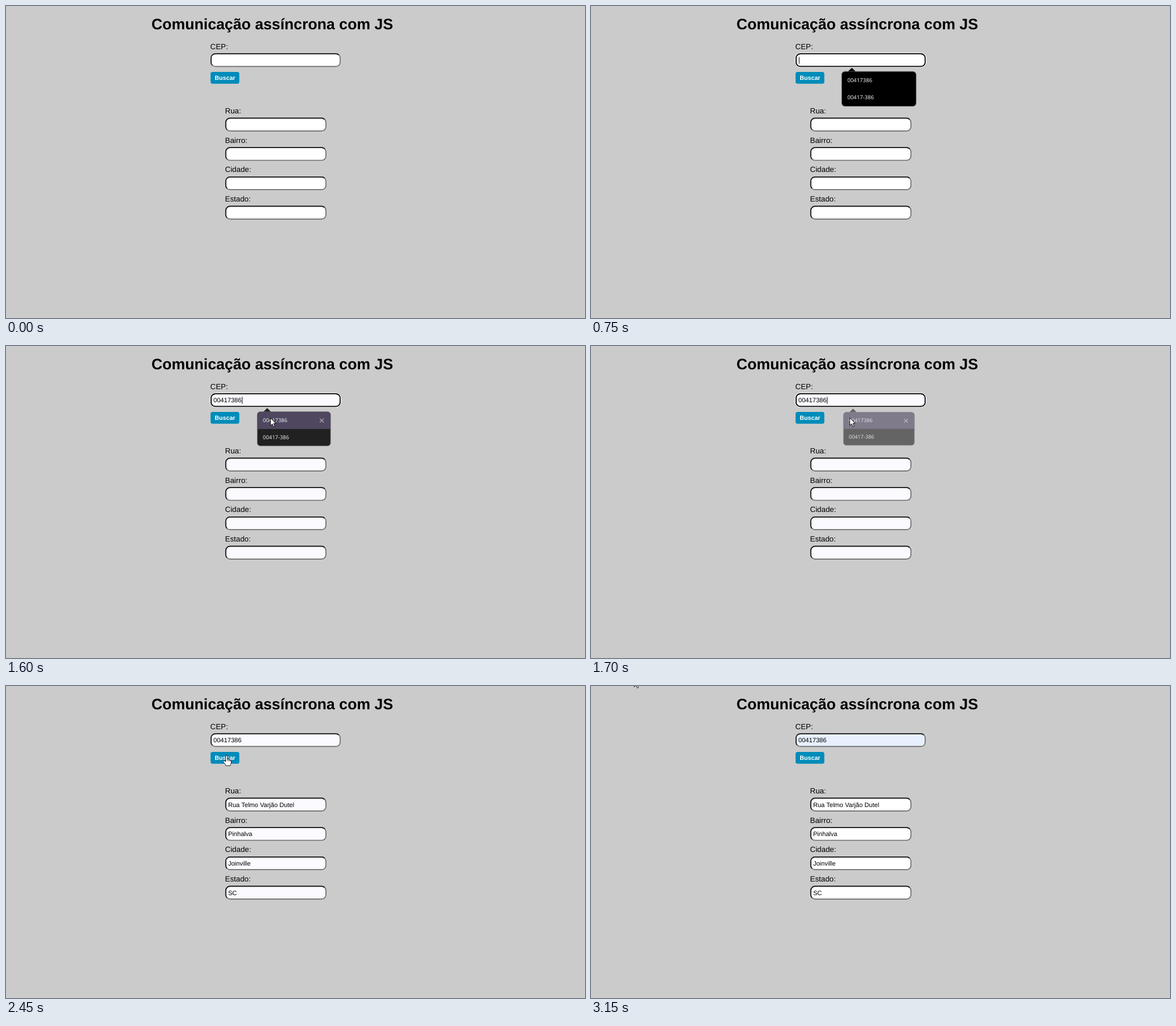
These frames come from a looping animation (1019x549 px, 3.3 s). An HTML page:

```html
<!DOCTYPE html>
<html lang="pt-BR">
<head>
<meta charset="utf-8">
<title>Comunicação assíncrona com JS</title>
<style>
  html, body { margin: 0; width: 100%; height: 100%; overflow: hidden; background: #cbcbcb; }
  svg { display: block; width: 100%; height: 100%; }
  text { font-family: "Liberation Sans", Arial, sans-serif; text-rendering: geometricPrecision; }
  .title { font-size: 26.67px; font-weight: bold; }
  .label { font-size: 13.33px; }
  .value { font-size: 11.11px; }
  .button { font-size: 10.67px; font-weight: bold; fill: #fff; text-anchor: middle; }
  .option { font-family: "Open Sans", "Noto Sans", sans-serif; font-size: 9.55px; fill: #fff; }
</style>
</head>
<body>
<svg viewBox="0 0 1019 549">
  <rect width="1019" height="549" fill="#cbcbcb"/>
  <text class="title" x="256" y="41">Comunicação assíncrona com JS</text>
  <g id="form"></g>
  <rect x="360" y="116" width="50.6" height="20.7" rx="3.5" fill="#008cba"/>
  <text class="button" x="385.4" y="130.2">Buscar</text>

  <g id="focus" fill="none">
    <rect x="359.5" y="82.7" width="230" height="25" rx="8.8" stroke="#fff"/>
    <rect x="360.9" y="84.1" width="227.2" height="22.2" rx="7.4" stroke="#101010" stroke-width="1.8"/>
  </g>
  <rect id="caret" y="89.6" width="1" height="12" fill="#000"/>

  <g id="popup">
    <path d="M452 115.5L459 108.8L466 115.5Z"/>
    <rect x="441.3" y="115.3" width="130.8" height="61" rx="5.5" stroke="#555" stroke-width=".8"/>
    <g id="hover">
      <path d="M441.5 146V120.5a5 5 0 0 1 5-5H567a5 5 0 0 1 5 5V146Z" fill="#372e4c"/>
      <path d="M553 127.4l7 7m0-7l-7 7" stroke="#aaa5b2" stroke-width="1.3"/>
    </g>
    <text class="option" x="451.2" y="134.1">00417386</text>
    <text class="option" x="451.2" y="164">00417-386</text>
  </g>

  <g stroke="#000" stroke-width=".9" stroke-linejoin="round" fill="#fff">
    <path id="arrow" d="M0 0V13.6L3.2 10.7L5.4 15.6L7.6 14.6L5.4 9.9H9.4Z"/>
    <g id="hand">
      <path d="M-1.6 10.2V1.4a1.6 1.6 0 0 1 3.2 0V6.2c1.6-.5 2.4 0 2.6.8c1.2-.4 2 .1 2.2.9c1-.2 1.7.4 1.7 1.5v3c0 2-1.5 2.8-1.5 5.2H-1.4c-.4-2-3-4.400-4.900-7c-.9-1.500.8-2.400 2-1.400z"/>
      <path d="M1.6 6.200v3.200M4.200 7v2.800M6.400 7.900v2.300" fill="none"/>
    </g>
  </g>
</svg>
<script>
const LOOP = 3300, STEP = 50;
const CEP = "00417386";
const ANSWERS = [
  ["Rua:", "Rua Telmo Varjão Dutel"],
  ["Bairro:", "Pinhalva"],
  ["Cidade:", "Joinville"],
  ["Estado:", "SC"]
];

// Pointer strokes: start, end, from x, y, to x, y
const MOVES = [
  [100, 500, 188, 34, 359, 87],
  [850, 1300, 372, 97, 465.5, 126.5],
  [1600, 2000, 465.5, 126.5, 401.5, 124.5],
  [2100, 2300, 401.5, 124.5, 388.3, 122.5],
  [2700, 3150, 388.3, 122.5, 76, -12]
];

const $ = id => document.getElementById(id);
const clamp = v => Math.max(0, Math.min(1, v));
const within = (t, a, b) => t >= a && t < b;
const show = (el, on) => el.setAttribute("visibility", on ? "visible" : "hidden");

function add(tag, attrs, text = "") {
  const el = document.createElementNS("http://www.w3.org/2000/svg", tag);
  for (const k in attrs) el.setAttribute(k, attrs[k]);
  el.textContent = text;
  return $("form").appendChild(el);
}

// Label plus a rounded box with an inset border
function field(label, left, top, width) {
  const x = left + .85, y = top + .85, w = width - 1.7, h = 22.4, r = 7.5, k = r * .293;
  add("text", { class: "label", x: left - .4, y: top - 7.5 }, label);
  const box = add("rect", { x, y, width: w, height: h, rx: r, stroke: "#6c6c6c", "stroke-width": 1.7 });
  const arc = `A${r} ${r} 0 0 1 `;
  add("path", {
    d: `M${x + k} ${y + h - k}${arc}${x} ${y + h - r}V${y + r}${arc}${x + r} ${y}` +
       `H${x + w - r}${arc}${x + w - k} ${y + k}`,
    fill: "none", stroke: "#1a1a1a", "stroke-width": 1.7
  });
  const value = add("text", { class: "value", x: left + 5, y: top + 16.1 });
  return { box, value };
}

const cep = field("CEP:", 360, 83.2, 229);
const fields = ANSWERS.map(([label], i) => field(label, 385.9, 196.6 + i * 51.67, 178));

function pointer(t) {
  if (t < 100 || within(t, 550, 850)) return null;
  const [a, b, x0, y0, x1, y1] = MOVES.filter(m => t >= m[0]).pop();
  const p = clamp((t - a) / (b - a));
  const e = a === 850 ? 1 - (1 - p) ** 1.9 : a === 1600 ? p * p * (3 - 2 * p) : p;
  return [x0 + (x1 - x0) * e, y0 + (y1 - y0) * e];
}

function draw(now) {
  const t = Math.floor(now % LOOP / STEP) * STEP;
  const pos = pointer(t);
  const [x, y] = pos || [0, 0];
  const overInput = within(x, 360, 589) && within(y, 83, 107);
  const overButton = within(x, 360, 411) && within(y, 116, 137);
  const hand = $("hand"), arrow = $("arrow");
  show(hand, pos && overButton);
  show(arrow, pos && !overButton && !overInput);
  for (const el of [hand, arrow]) el.setAttribute("transform", `translate(${x} ${y})`);

  const fade = 1 - clamp((t - 1550) / 300);
  const s = .91 + .09 * fade;
  show($("popup"), t >= 750 && fade > 0);
  $("popup").setAttribute("opacity", fade);
  $("popup").setAttribute("transform", `translate(506.700 142.500) scale(${s}) translate(-506.700 -142.500)`);
  $("hover").setAttribute("opacity", t >= 850 && t < 1850 && (t >= 1600 || x > 441 && y > 115) ? 1 : 0);

  const filled = t >= 1300;
  show($("focus"), within(t, 750, 2300));
  show($("caret"), within(t, 750, 2300) && !within(t, 1300, 1500));
  $("caret").setAttribute("x", filled ? 415.2 : 365.8);
  cep.value.textContent = filled ? CEP : "";

  const tinted = within(t, 1500, 1850) || within(t, 2100, 2700);
  cep.box.setAttribute("fill", tinted ? "#fafaff" : filled ? "#e8f0fe" : "#fff");
  fields.forEach((f, i) => {
    f.box.setAttribute("fill", tinted ? "#fafaff" : "#fff");
    f.value.textContent = t >= 2450 ? ANSWERS[i][1] : "";
  });
}

const start = performance.now();
function tick() {
  draw(performance.now() - start);
  requestAnimationFrame(tick);
}
tick();
</script>
</body>
</html>
```
